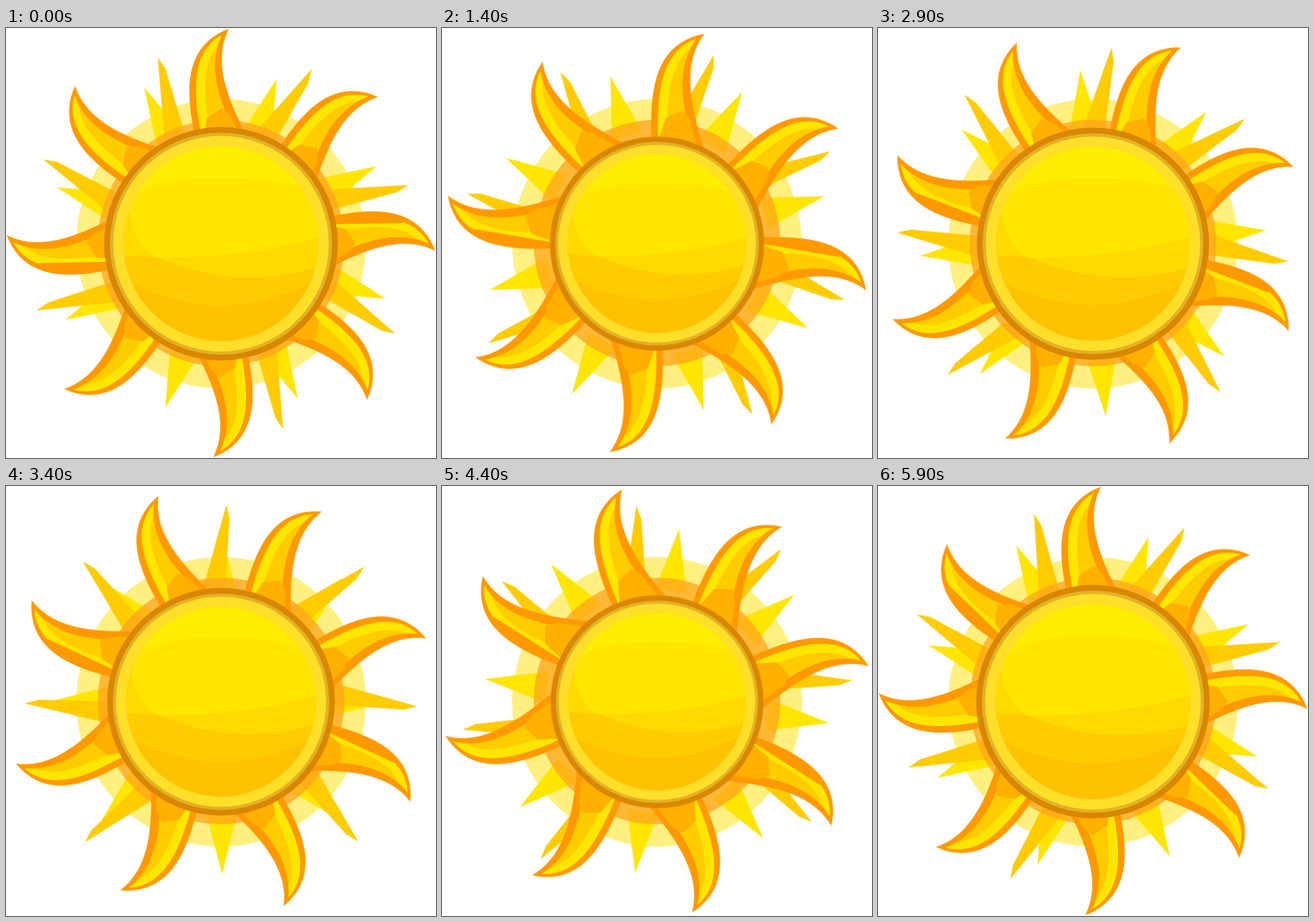
An HTML page without scripts that plays this animation: 600x600 px, repeating every 6 s.

```html
<!DOCTYPE html>
<html lang="en">
<head>
<meta charset="utf-8">
<title>Sun</title>
<style>
  html, body { margin: 0; width: 100%; height: 100%; overflow: hidden; background: #fff; }
  svg { display: block; width: 100vw; height: 100vh; }

  .spin, .counter { animation: spin 6s steps(60, jump-none) infinite; }
  .counter { animation-name: counter; }
  .pulse { transform-origin: 300px 301px; animation: pulse 6s infinite; }

  @keyframes spin { from { transform: rotate(0deg); } to { transform: rotate(45deg); } }
  @keyframes counter { from { transform: rotate(0deg); } to { transform: rotate(-45deg); } }
  @keyframes pulse {
    0% { transform: scale(1); animation-timing-function: steps(15); }
    25% { transform: scale(.911); animation-timing-function: steps(15); }
    50% { transform: scale(1); animation-timing-function: steps(14); }
    73.3333% { transform: scale(.911); animation-timing-function: steps(15); }
    98.3333%, 100% { transform: scale(1); }
  }
</style>
</head>
<body>
<svg viewBox="0 0 600 600">
  <defs>
    <path id="thin" d="M0-274 5-255 1-150H-31Z"/>
    <path id="wide" d="M0-242 22-155H-22Z"/>
    <g id="ray">
      <path fill="#f90" d="M-34-140C-51-210-53-275 11-299C-11-255 6-205 40-142Z"/>
      <path fill="#ffe600" d="M-25-140C-39-205-44-265 1-290C-18-250-8-205 26-142Z"/>
      <path fill="#fc0" d="M-12-140C-29-215-23-255-4.7-275C-15.7-239-4.3-198 26-142Z"/>
      <path fill="#ffb000" d="M-25-140-20-174 1-188 14-177 30-142Z"/>
    </g>
    <path id="thickEdge" fill="#f90" d="M-26-145-28-255-41-235-35-145Z"/>
    <!-- Eight copies come from doubling three times -->
    <g id="wide2"><use href="#wide"/><use href="#wide" transform="rotate(45)"/></g>
    <g id="wide4"><use href="#wide2"/><use href="#wide2" transform="rotate(90)"/></g>
    <g id="ray2"><use href="#ray"/><use href="#ray" transform="rotate(45)"/></g>
    <g id="ray4">
      <use href="#ray2"/>
      <use href="#ray2" transform="rotate(90)"/>
      <use href="#thickEdge" transform="rotate(90)"/>
    </g>
    <clipPath id="face"><circle cx="300" cy="301" r="136"/></clipPath>
  </defs>

  <circle cx="300" cy="301" r="202" fill="#fff080"/>

  <g transform="translate(300 300)">
    <g class="spin" fill="#ffe600">
      <use href="#wide4" transform="rotate(18.7)"/>
      <use href="#wide4" transform="rotate(198.7)"/>
    </g>
    <g class="counter" fill="#fc0">
      <use href="#thin" transform="rotate(-18.8)"/>
      <use href="#thin" transform="rotate(27.5)"/>
      <use href="#thin" transform="rotate(72.8)"/>
      <use href="#thin" transform="rotate(117.5)"/>
      <use href="#thin" transform="rotate(161.6)"/>
      <use href="#thin" transform="rotate(249.9)"/>
      <use href="#thin" transform="rotate(295.2)"/>
    </g>
  </g>

  <circle cx="300" cy="300" r="172" fill="#ffa51f" fill-opacity=".75"/>

  <g transform="translate(300 300)">
    <g class="spin">
      <use href="#ray4"/>
      <use href="#ray4" transform="rotate(180)"/>
    </g>
  </g>

  <g class="pulse">
    <circle cx="300" cy="301" r="163" fill="#d98600"/>
    <circle cx="300" cy="301" r="155" fill="#e3b126"/>
    <circle cx="300" cy="301" r="150.5" fill="#ffdf2a"/>
    <g clip-path="url(#face)">
      <path fill="#ffc200" d="M160 160H440V440H160Z"/>
      <path fill="#fc0" d="M160 160H440V348Q300 426 160 348Z"/>
      <path fill="#ffda00" d="M160 160H440V332C350 361 270 346 210 320L160 317Z"/>
      <path fill="#ffe600" d="M190 160H440V290Q335 322 207 320C178 297 165 262 178 235Z"/>
      <path fill="#fe0" d="M160 160H440V240Q410 209 300 209Q190 209 174 245L160 240Z"/>
    </g>
  </g>
</svg>
</body>
</html>
```
